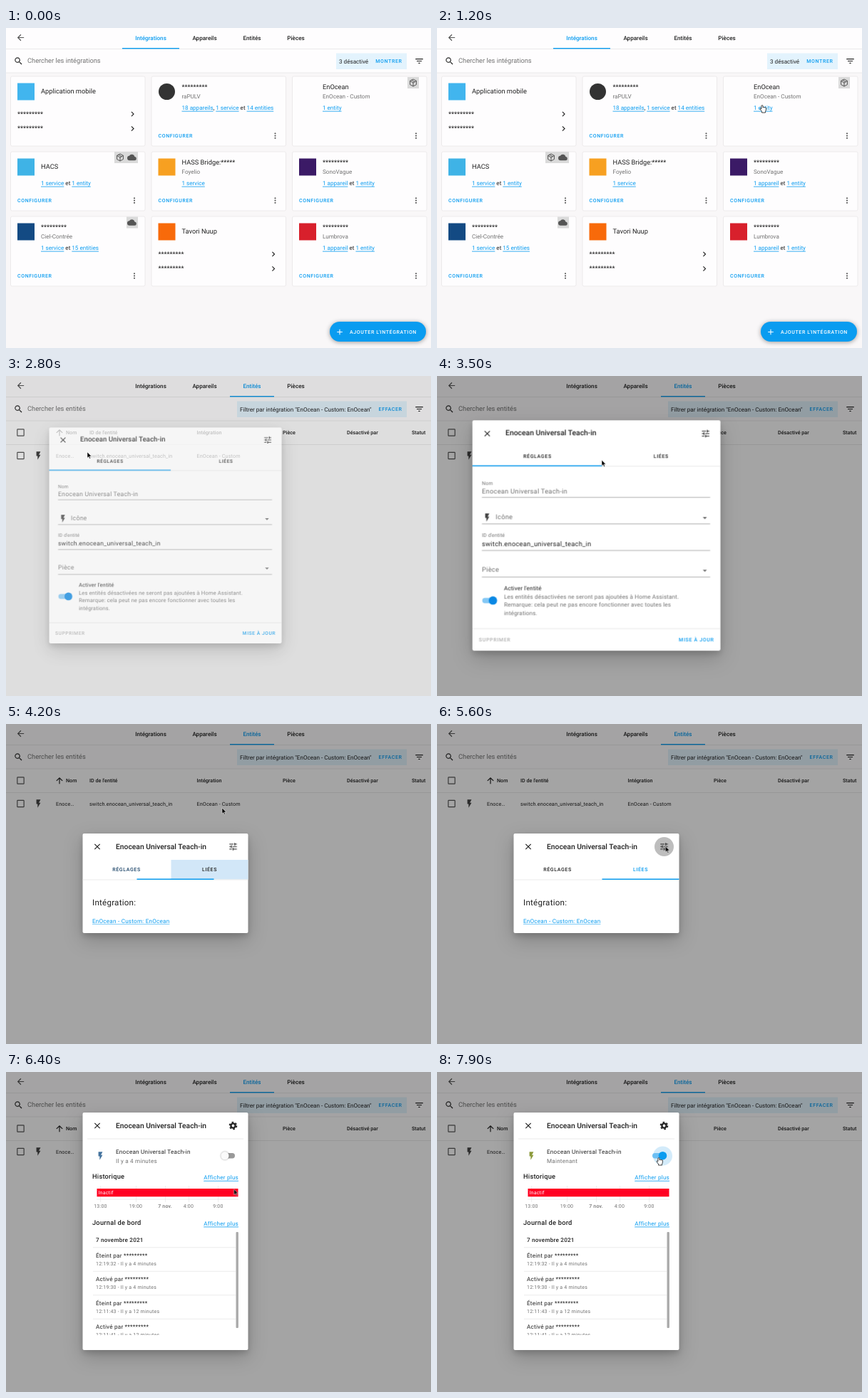
Animation, 596 px wide and 450 px high, one loop 8000 ms. Source, as an HTML page:

```html
<!DOCTYPE html>
<html lang="fr">
<head>
<meta charset="utf-8">
<title>Intégrations et entités</title>
<style>
html, body { margin: 0; width: 100%; height: 100%; overflow: hidden; background: #fff; }
svg { display: block; width: 100vw; height: 100vh; font: 8.12px Roboto, sans-serif; fill: #212121; text-rendering: geometricPrecision; }
text { dominant-baseline: central; white-space: pre; }
.mid { text-anchor: middle; }
.end { text-anchor: end; }
.big { font-size: 9.28px; }
.med { font-weight: 500; }
.grey { fill: #727272; }
.blue, .link { fill: #0a9cf0; }
.link { text-decoration: underline; text-decoration-thickness: .6px; text-underline-offset: .9px; }
.btn { font-size: 7px; font-weight: 500; letter-spacing: .63px; }
.cell { font-size: 7.2px; letter-spacing: .13px; }
.head { font-size: 7.2px; font-weight: 500; }
.title { font-size: 10.3px; font-weight: 500; }
.wide { letter-spacing: .23px; }
.small { font-size: 7px; letter-spacing: .22px; }
.line { stroke: #e2e2e2; stroke-width: .7; }
.rule { stroke: #949494; stroke-width: .7; }
.card { fill: #fefdfe; stroke: #e9e6e8; stroke-width: .8; }
.panel { fill: #fff; filter: drop-shadow(0 4px 4px rgba(0, 0, 0, .16)) drop-shadow(0 9px 13px rgba(0, 0, 0, .2)); }
.settings, .info { transform-origin: 223.5px 224px; }
.settings .btn { font-size: 6.6px; letter-spacing: .6px; }
.settings .title { font-size: 9.7px; }
.settings .field { font-size: 8.7px; letter-spacing: .25px; }
.settings .label { font-size: 6.6px; letter-spacing: .1px; }
.settings .note { font-size: 7.6px; letter-spacing: .13px; }
.spinner { transform-origin: 223.5px 216px; }
</style>
</head>
<body>
<svg id="stage" viewBox="0 0 596 450"></svg>
<script>
const LOOP = 8000;
const shapes = {
  back: 'M20 11H7.83l5.59-5.59L12 4l-8 8 8 8 1.41-1.41L7.83 13H20z',
  search: 'M9.5 3a6.5 6.5 0 0 1 4.94 10.73l.27.27h.79l5 5-1.5 1.5-5-5v-.79l-.27-.27A6.5 6.5 0 1 1 9.5 3m0 2a4.5 4.5 0 1 0 0 9 4.5 4.5 0 0 0 0-9',
  filter: 'M6 13h12v-2H6M3 6v2h18V6M10 18h4v-2h-4z',
  close: 'M19 6.41 17.59 5 12 10.59 6.41 5 5 6.41 10.59 12 5 17.59 6.41 19 12 13.41 17.59 19 19 17.59 13.41 12z',
  tune: 'M3 17v2h6v-2H3M3 5v2h10V5H3m10 16v-2h8v-2h-8v-2h-2v6h2M7 9v2H3v2h4v2h2V9H7m14 4v-2H11v2h10m-6-4h2V7h4V5h-4V3h-2z',
  bolt: 'M7 2v11h3v9l7-12h-4l4-8z',
  chevron: 'M8.59 16.59 13.17 12 8.59 7.41 10 6l6 6-6 6z',
  dots: 'M12 16a2 2 0 1 0 .01 0zM12 10a2 2 0 1 0 .01 0zM12 4a2 2 0 1 0 .01 0z',
  up: 'M13 20h-2V8l-5.5 5.5-1.42-1.42L12 4.16l7.92 7.92-1.42 1.42L13 8z',
  box: 'M19 3H5a2 2 0 0 0-2 2v14a2 2 0 0 0 2 2h14a2 2 0 0 0 2-2V5a2 2 0 0 0-2-2m0 2v14H5V5z',
  cloud: 'M6 20a6 6 0 0 1-.65-11.96 7.5 7.5 0 0 1 14 2A5 5 0 0 1 19 20z',
  plus: 'M19 13h-6v6h-2v-6H5v-2h6V5h2v6h6z',
  drop: 'M7 10l5 5 5-5z'
};

// Drawing helpers; text is placed by its vertical centre.
const text = (x, y, s, cls = '') => `<text x="${x}" y="${y}" class="${cls}">${s}</text>`;
const link = s => `<tspan class="link">${s}</tspan>`;
const rect = (x, y, w, h, attrs = '') => `<rect x="${x}" y="${y}" width="${w}" height="${h}" ${attrs}/>`;
const circle = (x, y, r, attrs = '') => `<circle cx="${x}" cy="${y}" r="${r}" ${attrs}/>`;
const line = (x1, x2, y, cls = 'line') => `<path d="M${x1} ${y}H${x2}" class="${cls}"/>`;
const group = (cls, ...parts) => `<g class="${cls}">${parts.join('')}</g>`;
const icon = (name, x, y, size = 14, attrs = '') =>
  `<path d="${shapes[name]}" transform="translate(${x - size / 2} ${y - size / 2}) scale(${size / 24})" ${attrs}/>`;
const cube = (x, y) => `<path d="M0-5 4.4-2.6V2.6L0 5-4.4 2.6V-2.6ZM-4.4-2.6 0 0 4.4-2.6M0 0V5M-2.3-3.8 2.2-1.3" transform="translate(${x} ${y})" fill="none" stroke="#444" stroke-width=".9"/>`;
const gear = (x, y) => circle(x, y, 3.1, 'fill="none" stroke="#212121" stroke-width="2.4"') +
  circle(x, y, 4.9, 'fill="none" stroke="#212121" stroke-width="1.8" stroke-dasharray="2.56 2.57"');

// Timeline helpers; keys are milliseconds within the loop.
let css = '';
const track = (name, frames, ease = 'step-end') => {
  const keys = Object.entries(frames).map(([ms, rule]) => `${ms / LOOP * 100}%{${rule}}`);
  css += `@keyframes ${name}{${keys.join('')}}.${name}{animation:${name} ${LOOP}ms ${ease} infinite}`;
};
const show = (name, ...times) => {
  const frames = { 0: 'opacity:0' };
  times.forEach((ms, i) => frames[ms] = `opacity:${1 - i % 2}`);
  track(name, frames);
};
const follow = (name, points) => {
  const frames = {};
  points.forEach(([ms, x, y], i) => {
    const next = points[i + 1];
    const steps = next ? (next[0] - ms) / 100 : 1;
    frames[ms] = `transform:translate(${x}px,${y}px);animation-timing-function:steps(${steps})`;
  });
  track(name, frames);
};

const tabs = [['Intégrations', 203], ['Appareils', 278.5], ['Entités', 345], ['Pièces', 406.5]];
function header(active, barX, barWidth, query, chipX, chip, action) {
  return rect(0, 0, 596, 63, 'fill="#fefdfe"') + line(0, 596, 29.5) + line(0, 596, 63) +
    icon('back', 20.5, 13.5, 14, 'fill="#555"') +
    tabs.map(([s, x], i) => text(x, 13.5, s, 'mid med' + (i === active ? ' blue' : ''))).join('') +
    rect(barX, 28, barWidth, 1.4, 'class="blue"') +
    icon('search', 17.5, 46.5) + text(30, 46.5, query, 'big grey') +
    rect(chipX, 35.5, 562 - chipX, 22.5, 'fill="#e3f3fd"') +
    text(chipX + 4, 46.5, chip) + text(555.5, 46.5, action, 'btn blue end') +
    icon('filter', 579.5, 46.5);
}

const mask = '*********';
const cards = [
  ['Application mobile', '', null, '#41b5ee'],
  [mask, 'raPULV', `${link('18 appareils')}, ${link('1 service')} et ${link('14 entities')}`, '#333'],
  ['EnOcean', 'EnOcean - Custom', link('1 entity'), ''],
  ['HACS', '', `${link('1 service')} et ${link('1 entity')}`, '#3fb3e6'],
  ['HASS Bridge:*****', 'Foyelio', link('1 service'), '#f7a021'],
  [mask, 'SonoVague', `${link('1 appareil')} et ${link('1 entity')}`, '#3b1a66'],
  [mask, 'Ciel-Contrée', `${link('1 service')} et ${link('15 entities')}`, '#134a83'],
  ['Tavori Nuup', '', null, '#f86a0a'],
  [mask, 'Lumbrova', `${link('1 appareil')} et ${link('1 entity')}`, '#d8202c']
];
function card([title, sub, body, color], i) {
  const x = 6.5 + 197.5 * (i % 3), row = Math.floor(i / 3);
  const y = [68, 174, 265][row], h = row === 1 ? 83 : 98, foot = y + h - 14.5;
  let out = rect(x, y, 188.5, h, 'rx="2" class="card"');
  if (i === 1) out += circle(x + 21.5, y + 21.5, 11.5, `fill="${color}"`);
  else if (color) out += rect(x + 9.5, y + 9.5, 24, 24, `fill="${color}"`);
  out += text(x + 42.5, y + (sub ? 15.5 : 21.2), title, 'big') + text(x + 42.5, y + 28, sub, 'grey');
  if (!body) return out + [53, 73.5].map(dy =>
    text(x + 9.5, y + dy, mask, 'big') + icon('chevron', x + 171, y + dy)).join('');
  out += text(x + 42.5, y + 43.7, body) + icon('dots', x + 173.5, foot, 13, 'fill="#555"');
  return color ? out + text(x + 9.5, foot, 'CONFIGURER', 'btn blue') : out;
}
const badge = (x, y, w) => rect(x, y, w, 16, 'fill="#dadada"');

const integrations = group('integrations',
  rect(0, 0, 596, 450, 'fill="#f9f7f8"'),
  header(0, 163, 80, 'Chercher les intégrations', 463, '3 désactivé', 'MONTRER'),
  ...cards.map(card),
  badge(563, 69, 16), cube(571, 77),
  badge(152, 174, 33), cube(160, 182), icon('cloud', 176.5, 182, 13, 'fill="#555"'),
  badge(169, 265.5, 16), icon('cloud', 176.5, 273.5, 13, 'fill="#555"'),
  rect(454, 413, 135, 28, 'rx="14" class="blue" style="filter:drop-shadow(0 1.5px 3px rgba(0,0,0,.38))"'),
  icon('plus', 468, 427.5, 13, 'fill="#fff"'),
  `<g style="fill:#fff">${text(482, 427.5, "AJOUTER L'INTÉGRATION", 'btn')}</g>`);

const columns = [['Nom', 84], ["ID de l'entité", 117], ['Intégration', 267.5], ['Pièce', 388], ['Désactivé par', 478], ['Statut', 569]];
const entities = group('entities',
  rect(0, 0, 596, 450, 'fill="#fefefe"'),
  header(2, 314, 62, 'Chercher les entités', 324, 'Filtrer par intégration "EnOcean - Custom: EnOcean"', 'EFFACER'),
  rect(0, 97, 596, 30, 'class="rowHover" fill="#f1f1f1"'),
  line(0, 596, 96.5),
  icon('box', 20.5, 79.5, 14, 'fill="#555"'), icon('box', 20.5, 112, 14, 'fill="#555"'),
  icon('up', 75, 79.5), icon('bolt', 45.5, 112, 14, 'fill="#444"'),
  ...columns.map(([s, x]) => text(x, 79.5, s, 'head')),
  text(70, 112, 'Enoce…', 'cell'),
  text(117, 112, 'switch.enocean_universal_teach_in', 'cell'),
  text(267.5, 112, 'EnOcean - Custom', 'cell'));

const NAME = 'Enocean Universal Teach-in';
const settings = group('settings',
  rect(60.5, 72.5, 326, 303.5, 'rx="2" class="panel"'),
  icon('close', 80, 90, 13), text(104, 90, NAME, 'title'), icon('tune', 367, 90, 13),
  text(146, 120.5, 'RÉGLAGES', 'btn mid'), text(308.5, 120.5, 'LIÉES', 'btn mid'),
  line(60.5, 386.5, 133), rect(60.5, 131.7, 170.5, 1.4, 'class="blue"'),
  text(73, 155.5, 'Nom', 'label grey'), text(73, 166.5, NAME, 'field grey'),
  icon('bolt', 80, 200.5, 13, 'fill="#444"'), text(91, 201, 'Icône', 'field grey'),
  text(73, 224.5, "ID d'entité", 'label grey'), text(73, 236, 'switch.enocean_universal_teach_in', 'field'),
  text(73, 270.5, 'Pièce', 'field grey'),
  ...[174, 209, 244, 279].map(y => line(73, 373, y, 'rule')),
  ...[201, 270.5].map(y => icon('drop', 366, y, 13, 'fill="#666"')),
  rect(73.5, 306.5, 17, 7, 'rx="3.5" fill="#84c8f5"'), circle(87.5, 310, 5.5, 'fill="#0a88e4"'),
  text(102, 293.5, "Activer l'entité", 'note'),
  text(102, 305, 'Les entités désactivées ne seront pas ajoutées à Home Assistant.', 'note grey'),
  text(102, 315.5, 'Remarque: cela peut ne pas encore fonctionner avec toutes les', 'note grey'),
  text(102, 326.5, 'intégrations.', 'note grey'),
  line(60.5, 386.5, 347),
  `<g opacity=".35">${text(69, 361.5, 'SUPPRIMER', 'btn')}</g>`,
  text(378, 361.5, 'MISE À JOUR', 'btn blue end'));

const linked = group('linked',
  rect(107.5, 154, 232, 140, 'rx="2" class="panel"'),
  circle(318.5, 172.5, 13.5, 'class="iconHover" fill="#bdbdbd"'),
  icon('close', 128, 172.5), text(154, 172.5, NAME, 'title'), icon('tune', 318.5, 172.5),
  rect(231.5, 191, 108, 27.5, 'class="ripple" fill="#d2e7f8"'),
  text(169, 205, 'RÉGLAGES', 'btn mid oldTab'), text(285.5, 205, 'LIÉES', 'btn mid newTab'),
  line(107.5, 339.5, 219), rect(231.5, 217.5, 108, 1.5, 'class="blue indicator"'),
  `<g font-size="11.6">${text(121, 251, 'Intégration:', 'wide')}</g>`,
  text(121, 276.5, link('EnOcean - Custom: EnOcean'), 'wide'));

const hours = [['13:00', 132.5], ['19:00', 182], ['7 nov.', 223], ['4:00', 256], ['9:00', 297.5]];
const log = [['Éteint', '12:19:32', 4], ['Activé', '12:19:30', 4], ['Éteint', '12:11:43', 12], ['Activé', '12:11:41', 12]];
const info = group('info',
  rect(107.5, 126, 232, 196, 'rx="2" class="panel compact"'),
  rect(107.5, 57, 232, 334, 'rx="2" class="panel expanded"'),
  group('overview',
    icon('close', 128, 75.5), text(154, 75.5, NAME, 'title'), gear(318.5, 75.5),
    line(114, 333, 94), icon('bolt', 132.5, 118, 14, 'class="state"'),
    text(154, 112, NAME, 'wide'),
    group('before', text(154, 124.5, 'Il y a 4 minutes', 'wide grey')),
    group('after', text(154, 124.5, 'Maintenant', 'wide grey')),
    group('off', rect(304, 114, 17, 7.5, 'rx="3.7" fill="#999"'),
      circle(307, 117.7, 5.6, 'fill="#fafafa" style="filter:drop-shadow(0 .6px .8px rgba(0,0,0,.4))"')),
    group('on', circle(316.5, 118, 13.5, 'fill="#d3ebfa"'), rect(302, 114, 18, 7.5, 'rx="3.7" fill="#6cbff3"'),
      circle(316.5, 117.7, 5.8, 'class="blue"')),
    text(121, 147.8, 'Historique', 'big med wide'), text(326, 147.8, link('Afficher plus'), 'wide end'),
    ...hours.map(([, x]) => rect(x, 160, .6, 23, 'fill="#e4e4e4"')),
    line(127, 326, 179),
    rect(127.5, 164, 198, 11.3, 'fill="#ff0022"'),
    `<g style="fill:#fff">${text(129.5, 169.8, 'Inactif', 'small')}</g>`,
    ...hours.map(([s, x], i) => text(x, 189, s, 'small mid grey' + (i === 2 ? ' med' : ''))),
    group('loading', circle(223.5, 216, 8.3, 'class="blue spinner" style="fill:none;stroke:#0a9cf0;stroke-width:1.9" stroke-dasharray="6 60"'))),
  group('expanded',
    text(121, 212.5, 'Journal de bord', 'big med wide'), text(326, 212.5, link('Afficher plus'), 'wide end'),
    text(126, 236, '7 novembre 2021', 'med wide'),
    '<clipPath id="logArea"><rect x="107" y="224" width="232" height="146"/></clipPath><g clip-path="url(#logArea)">',
    ...log.map(([act, time, ago], i) => {
      const y = 257.5 + i * 33.5;
      return line(122, 322, y - 10.7) + text(126, y, `${act} par ${mask}`, 'wide') +
        text(126, y + 12, `${time} - Il y a ${ago} minutes`, 'small grey');
    }),
    '</g>', rect(322.5, 225, 3.4, 135, 'rx="1" fill="#aaa"')));

const cursor = group('cursor',
  '<path class="arrow" d="M0 0v8.2l1.9-1.8 1.3 2.9 1.3-.6-1.3-2.8h2.6z" fill="#000" stroke="#fff" stroke-width=".5"/>',
  '<path class="hand" transform="translate(-3 0)" d="M3 .6c-.7 0-1.1.5-1.1 1.1v4L1.2 5.2C.6 4.8-.2 5.4.2 6.1L2.5 9.4V11h5V9.5c.6-1 .9-1.8.9-3.2V4.4c0-.9-1.2-1-1.4-.2C6.9 3.3 5.7 3.2 5.5 4 5.3 3.2 4.2 3.2 4.1 3.9V1.7C4.1 1 3.6.6 3 .6z" fill="#fff" stroke="#111" stroke-width=".8"/>');

show('integrations', 0, 1500);
show('entities', 1500);
show('rowHover', 1500, 2800);
track('scrim', { 0: 'opacity:0', 2800: 'opacity:.125', 2900: 'opacity:.355', 5800: 'opacity:.208', 5900: 'opacity:.355' });
track('settings', { 0: 'opacity:0', 2800: 'opacity:.73;transform:none', 2900: 'opacity:1;transform:scale(1.067)', 4200: 'opacity:0' });
show('linked', 4200, 5800);
show('iconHover', 5400, 5800);
track('ripple', { 0: 'opacity:0', 4200: 'opacity:1', 4300: 'opacity:.85', 4400: 'opacity:.6', 4500: 'opacity:.3', 4600: 'opacity:0' });
track('oldTab', { 0: 'fill:#212121', 4200: 'fill:#1c4468', 4300: 'fill:#212121' });
track('newTab', { 0: 'fill:#212121', 4300: 'fill:#0a9cf0' });
track('indicator', { 0: 'transform:translate(-48px)', 4300: 'transform:translate(-8px)', 4400: 'transform:none' });
track('info', { 0: 'opacity:0', 5800: 'opacity:.92;transform:scale(.977)', 5900: 'opacity:1;transform:none' });
track('overview', { 0: 'transform:translate(0,69px)', 6100: 'transform:translate(0,0)' });
show('compact', 0, 6100);
show('loading', 5800, 6100);
show('expanded', 6100);
track('spinner', { 0: 'transform:rotate(-78deg)', 5800: 'transform:rotate(-78deg)', 6100: 'transform:rotate(60deg)', 8000: 'transform:rotate(60deg)' }, 'linear');
show('off', 0, 7700);
show('on', 7700);
show('before', 0, 7700);
show('after', 7700);
track('state', { 0: 'fill:#44739e', 7800: 'fill:#68866d', 7900: 'fill:#8c9a3c' });
show('arrow', 400, 1100, 2700, 3800, 4200, 6900);
show('hand', 1100, 2700, 3800, 4200, 6900);
follow('cursor', [
  [0, 520, 262], [400, 520, 262], [800, 470, 150], [1200, 456, 108], [1600, 456, 108],
  [2000, 299, 106], [2500, 114, 107], [3200, 114, 107], [3600, 270, 122], [4000, 303, 118],
  [4300, 303, 118], [5000, 312, 160], [5500, 320, 172], [5800, 321, 172], [6300, 321, 172],
  [7000, 311, 120], [8000, 311, 120]
]);

document.head.appendChild(document.createElement('style')).textContent = css;
document.getElementById('stage').innerHTML =
  integrations + entities + rect(0, 0, 596, 450, 'class="scrim" fill="#000"') +
  settings + linked + info + cursor;
</script>
</body>
</html>
```
